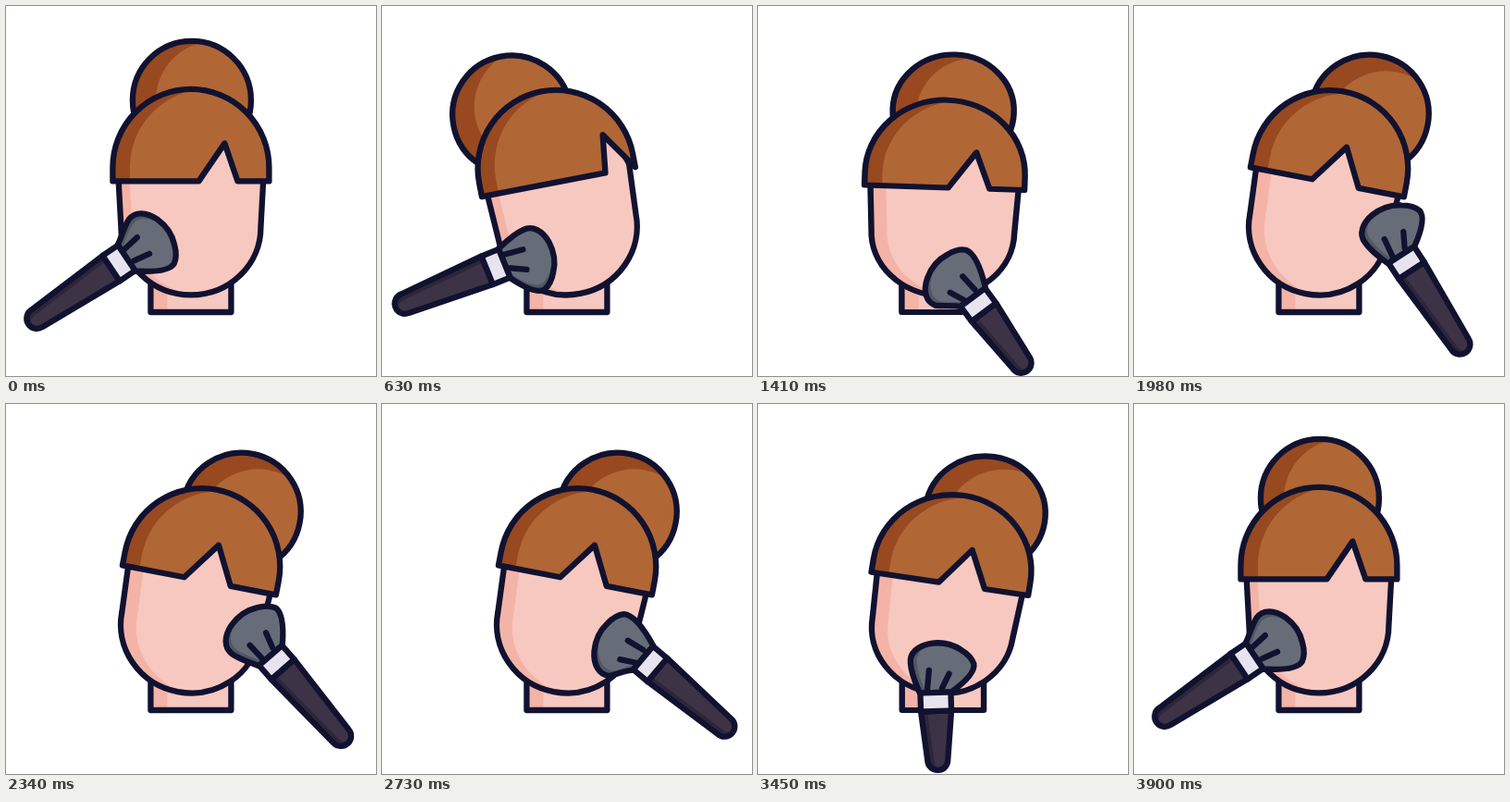
These frames come from a looping animation (400x400 px, 3.93 s). An HTML page with a canvas:

```html
<!DOCTYPE html>
<html lang="en">
<head>
<meta charset="utf-8">
<title>Make-up brush</title>
<style>
  html, body { margin: 0; width: 100%; height: 100%; overflow: hidden; background: #fff; }
  canvas { display: block; width: 400px; height: 400px; }
</style>
</head>
<body>
<canvas id="stage"></canvas>
<script>
const LOOP = 3930;
const INK = '#111230';
const HAIR = '#b06735', HAIR_DARK = '#984920';
const SKIN = '#f7c8c0', SKIN_DARK = '#f4b3a7';
const BRISTLE = '#666d78', BRISTLE_DARK = '#515763';
const HANDLE = '#3d3346', HANDLE_DARK = '#2d2639';
const FERRULE = '#e7e4ef';

const canvas = document.getElementById('stage');
const ctx = canvas.getContext('2d');
const dpr = window.devicePixelRatio || 1;
canvas.width = canvas.height = 400 * dpr;

const rad = deg => deg * Math.PI / 180;
const clamp = v => Math.max(0, Math.min(1, v));
const ease = p => (1 - Math.cos(Math.PI * p)) / 2;
const mix = (a, b, p) => a + (b - a) * p;

// Head turns: start, end, from side, to side (-1 left, 1 right)
const TURNS = [[0, 560, 0, -1], [1110, 1650, -1, 1], [3270, 3900, 1, 0]];

function headPose(t) {
  let side = 0, squash = 0;
  for (const [start, end, from, to] of TURNS) {
    if (t < start) break;
    const p = clamp((t - start) / (end - start));
    side = mix(from, to, ease(p));
    squash = Math.sin(Math.PI * p) ** 2;
  }
  return { side, squash };
}

// Brush poses: ferrule x, y, angle, handle length, bristle bend in degrees, shaded side
const REST = [122, 278, -34, 107, 0, 1];
const LEFT_LOW = [123, 282, -22, 106, 14, -1];
const LEFT_STEEP = [121, 274, -47, 106, -14, 1];
const RIGHT_LOW = [288, 284, -150, 106, -15, 1];
const RIGHT_STEEP = [294.5, 277.5, -123.3, 105.5, 15, 1];
const BRUSH = [
  [0, REST],
  [190, LEFT_LOW], [410, LEFT_STEEP], [630, LEFT_LOW], [850, LEFT_STEEP], [1070, LEFT_LOW],
  [1410, [238, 323, -126.3, 78, -13, 1]],
  [1760, RIGHT_LOW], [1980, RIGHT_STEEP], [2200, RIGHT_LOW], [2420, RIGHT_STEEP], [2640, RIGHT_LOW],
  [2730, [290, 281, -140, 105, -15, 1]],
  [2860, RIGHT_STEEP], [3080, RIGHT_LOW],
  [3230, [291, 281, -138, 105, 4, 1]],
  [3450, [192.5, 322, -92, 63, 14, 1]],
  [3880, REST], [LOOP, REST]
];

function slope(i, k) {
  const [t0, a] = BRUSH[i], [t1, b] = BRUSH[i + 1];
  return (b[k] - a[k]) / (t1 - t0);
}

// Harmonic tangent: flat at turning points, smooth through the rest
function tangent(i, k) {
  if (i === 0 || i === BRUSH.length - 1) return 0;
  const a = slope(i - 1, k), b = slope(i, k);
  return a * b > 0 ? 2 * a * b / (a + b) : 0;
}

function brushPose(t) {
  let i = 0;
  while (i < BRUSH.length - 2 && t >= BRUSH[i + 1][0]) i++;
  const [t0, a] = BRUSH[i], [t1, b] = BRUSH[i + 1];
  const d = t1 - t0, s = (t - t0) / d;
  const h = s * s * (3 - 2 * s);
  return a.map((v, k) => mix(v, b[k], h)
    + d * (s * (1 - s) ** 2 * tangent(i, k) - s * s * (1 - s) * tangent(i + 1, k)));
}

function outline(path) {
  ctx.strokeStyle = INK;
  ctx.stroke(path);
}

// Dark base with a shifted light shape clipped inside it
function shaded(path, dark, light, dx, dy, lightPath = path) {
  ctx.fillStyle = dark;
  ctx.fill(path);
  ctx.save();
  ctx.clip(path);
  ctx.translate(dx, dy);
  ctx.fillStyle = light;
  ctx.fill(lightPath);
  ctx.restore();
  outline(path);
}

const neck = new Path2D('M157 270V331H244V270Z');
// The face reaches up behind the fringe so that its notch shows skin
const face = new Path2D('M140 130L122 185L125 240A75.5 73 0 0 0 276 240L279 185L262 130Z');
const dome = new Path2D('M116 200V175A84.5 84.5 0 0 1 285 175V200Z');
const bun = new Path2D();
bun.arc(201.5, 102.5, 64, 0, 7);

function hairPath(side) {
  const to = side < 0 ? [252, 257, 285] : [184, 214, 235];
  const [a, b, c] = [209, 237, 251].map((x, i) => mix(x, to[i], Math.abs(side)));
  return new Path2D(`M116 190V175A84.5 84.5 0 0 1 285 175V190H${c}L${b} 149L${a} 190Z`);
}

function turnHead(side) {
  ctx.translate(200, 237);
  ctx.rotate(rad(10.9 * side));
  ctx.translate(-200, -237.6);
}

function drawBun(side) {
  ctx.save();
  turnHead(side);
  ctx.translate(side * (side < 0 ? 37 : 30), 6.5 * side * side);
  const spin = rad(side * (side < 0 ? 9 : 34));
  shaded(bun, HAIR_DARK, HAIR, 25 * Math.cos(spin), 25 * Math.sin(spin));
  ctx.restore();
}

function drawHead(t) {
  const { side, squash } = headPose(t);
  ctx.save();
  ctx.translate(199.4, 331);
  ctx.scale(1 + 0.025 * squash, 1 - 0.05 * squash);
  ctx.translate(-200, -331);
  drawBun(side);
  shaded(neck, SKIN_DARK, SKIN, 18, 0);
  turnHead(side);
  shaded(face, SKIN_DARK, SKIN, 12 + 5 * clamp(side * 5), 0);
  shaded(hairPath(side), HAIR_DARK, HAIR, 18.5, 0, dome);
  ctx.restore();
}

function drawBrush(t) {
  const [x, y, angle, length, bend, shade] = brushPose(t);
  // Bristles turn about the ferrule edge, where their roots stay fixed
  const pt = (u, v) => {
    const a = rad(bend) * clamp((u - 10) / 22);
    const c = Math.cos(a), s = Math.sin(a);
    return `${10 + (u - 10) * c - v * s} ${(u - 10) * s + v * c} `;
  };
  const curve = (...p) => 'C' + p.map(q => pt(...q)).join('');
  const bristles = new Path2D('M' + pt(10, -17)
    + curve([17, -21], [26, -29], [35, -33])
    + curve([46, -37], [56, -29], [61, -16])
    + curve([65, -5], [65, 7], [61, 17])
    + curve([58, 26], [54, 31], [49, 34])
    + curve([41, 37], [28, 31], [10, 17]) + 'Z');
  const hairs = new Path2D('M' + pt(13, -9) + 'L' + pt(32, -12)
    + 'M' + pt(15, 7) + 'L' + pt(33, 10));
  const ferrule = new Path2D('M-10 -16.5H10V16.5H-10Z');
  const end = -length;
  const handle = new Path2D(`M-10 -16.5L${end} -11A11 11 0 0 0 ${end} 11L-10 16.5Z`);

  ctx.save();
  ctx.translate(x, y);
  ctx.rotate(rad(angle));
  shaded(handle, HANDLE_DARK, HANDLE, 0, 7);
  shaded(bristles, BRISTLE_DARK, BRISTLE, 0, 7 * shade);
  outline(hairs);
  ctx.fillStyle = FERRULE;
  ctx.fill(ferrule);
  outline(ferrule);
  ctx.restore();
}

function draw(now) {
  const t = now % LOOP;
  ctx.setTransform(dpr, 0, 0, dpr, 0, 0);
  ctx.fillStyle = '#fff';
  ctx.fillRect(0, 0, 400, 400);
  ctx.lineWidth = 6.3;
  ctx.lineJoin = ctx.lineCap = 'round';
  drawHead(t);
  drawBrush(t);
}

const began = performance.now();
function tick() {
  draw(performance.now() - began);
  requestAnimationFrame(tick);
}
tick();
</script>
</body>
</html>
```
